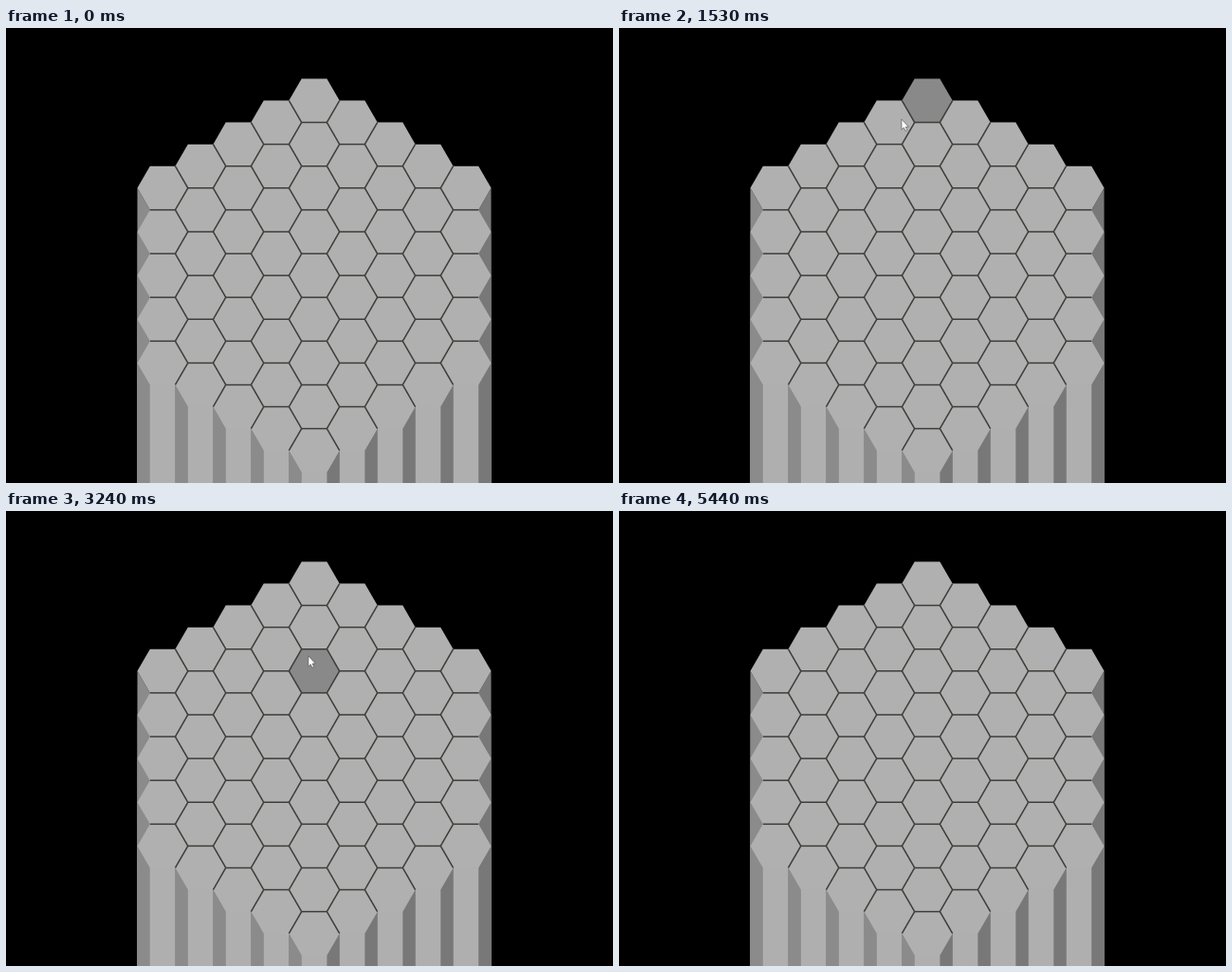
Animation, 640 px wide and 480 px high, one loop 5470 ms. Source, as an HTML page with a canvas:

```html
<!DOCTYPE html>
<html>
<head>
<meta charset="utf-8">
<title>Hexagon columns</title>
<style>
html, body { margin: 0; width: 100%; height: 100%; overflow: hidden; background: #000; }
canvas { display: block; }
</style>
</head>
<body>
<canvas id="stage" width="640" height="480"></canvas>
<script>
const ctx = document.getElementById('stage').getContext('2d');
const LOOP = 5470, HOVER_DELAY = 50;
const ROW = 46.15, R = ROW / Math.sqrt(3), RADIUS = 4;
const CENTER = { x: 325, y: 261.1 };

// Key points of the pointer path
const path = [
  { t: 300, x: 645, y: 290 },
  { t: 600, x: 536, y: 268 },
  { t: 1070, x: 474, y: 258 },
  { t: 1430, x: 325, y: 80 },
  { t: 1890, x: 238, y: 258 },
  { t: 2000, x: 279, y: 269 },
  { t: 2270, x: 325, y: 335 },
  { t: 2540, x: 225, y: 350 },
  { t: 3240, x: 319, y: 153 },
  { t: 3720, x: 5, y: 235 }
];

const cells = [];
for (let q = -RADIUS; q <= RADIUS; q++) {
  const count = 2 * RADIUS + 1 - Math.abs(q);
  for (let i = 0; i < count; i++) {
    cells.push({ x: CENTER.x + q * R * 1.5, y: CENTER.y + (i - (count - 1) / 2) * ROW });
  }
}
cells.sort((a, b) => a.y - b.y);

const polar = ({ x, y }, r, degrees) => {
  const a = degrees * Math.PI / 180;
  return { x: x + r * Math.cos(a), y: y + r * Math.sin(a) };
};

const cellAt = p => p && cells.find(c => Math.hypot(c.x - p.x, c.y - p.y) < ROW / 2 + 1);

// Seams lie only between neighbouring tops, never on the outer rim
const seams = cells.flatMap(c => [30, 90, 150]
  .filter(a => cellAt(polar(c, ROW, a)))
  .map(a => [polar(c, R, a - 30), polar(c, R, a + 30)]));

// Cubic Hermite curve through the key points
function pointerAt(t) {
  const i = path.findIndex(p => p.t > t);
  if (i < 1) return null;
  const a = path[i - 1], b = path[i];
  const before = path[i - 2] || a, after = path[i + 1] || b;
  const span = b.t - a.t, u = (t - a.t) / span;
  const axis = k => {
    const d = b[k] - a[k];
    const va = (b[k] - before[k]) / (b.t - before.t) * span;
    const vb = (after[k] - a[k]) / (after.t - a.t) * span;
    return a[k] + u * (va + u * (3 * d - 2 * va - vb + u * (va + vb - 2 * d)));
  };
  return { x: axis('x'), y: axis('y') };
}

function trace(points) {
  ctx.beginPath();
  points.forEach(p => ctx.lineTo(p.x, p.y));
}

function fill(points, grey) {
  trace(points);
  ctx.fillStyle = `rgb(${grey},${grey},${grey})`;
  ctx.fill();
}

function drawColumn(cell, hovered) {
  const shade = hovered ? 0.78 : 1;
  const corners = [0, 60, 120, 180, 240, 300].map(a => polar(cell, R, a));
  const face = (a, b, grey) =>
    fill([a, b, { x: b.x, y: 480 }, { x: a.x, y: 480 }], grey * shade);
  face(corners[3], corners[2], 139);
  face(corners[0], corners[1], 120);
  face(corners[2], corners[1], 175);
  fill(corners, 176 * shade);
}

function drawSeams() {
  ctx.strokeStyle = '#3c3c38';
  ctx.lineWidth = 1.5;
  for (const seam of seams) {
    trace(seam);
    ctx.stroke();
  }
}

function drawPointer({ x, y }) {
  ctx.save();
  ctx.translate(x, y);
  const arrow = new Path2D('M0 0V11L2.4 8.8 4 12.4 5.8 11.6 4.3 8.1 7.4 8Z');
  ctx.fillStyle = '#fff';
  ctx.fill(arrow);
  ctx.strokeStyle = '#555';
  ctx.lineWidth = 0.7;
  ctx.stroke(arrow);
  ctx.restore();
}

const start = performance.now();

function frame(now) {
  const t = Math.max(0, now - start) % LOOP;
  const hovered = cellAt(pointerAt(t - HOVER_DELAY));
  const pointer = pointerAt(t);
  ctx.clearRect(0, 0, 640, 480);
  cells.forEach(c => drawColumn(c, c === hovered));
  drawSeams();
  if (pointer) drawPointer(pointer);
  requestAnimationFrame(frame);
}
requestAnimationFrame(frame);
</script>
</body>
</html>
```
